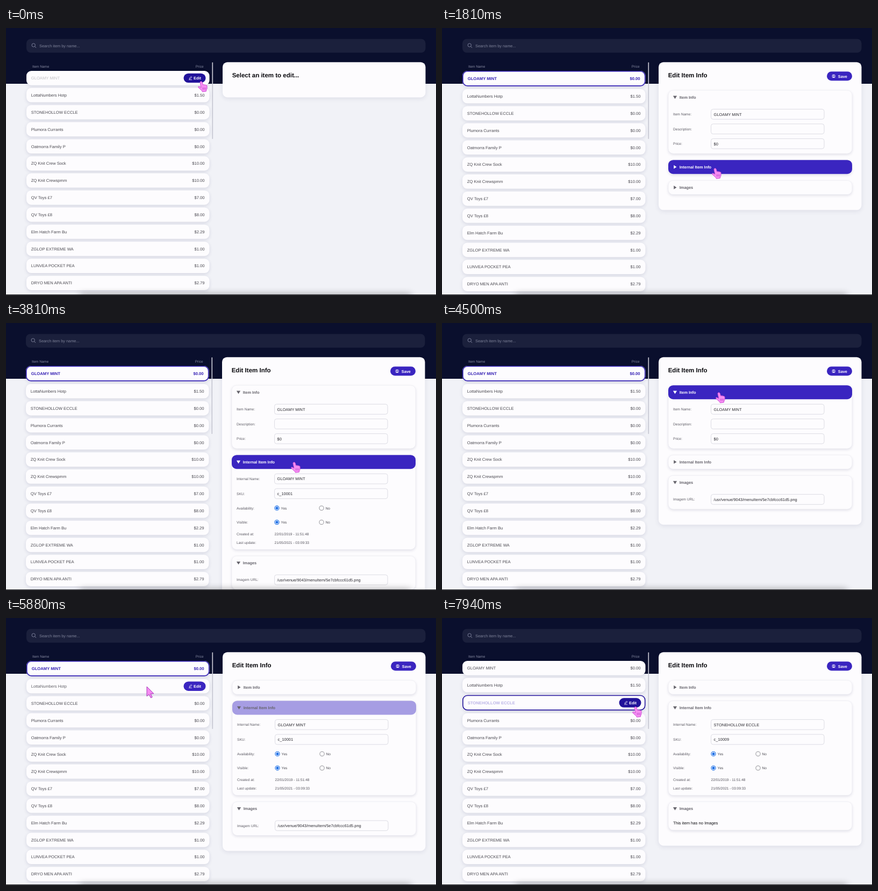
Write an HTML page with a canvas that moves like this. It is 800 by 498 pixels and loops after 8000 ms.

```html
<!DOCTYPE html>
<html lang="en">
<head>
<meta charset="utf-8">
<title>Item editor</title>
<style>
html, body { margin: 0; width: 100%; height: 100%; overflow: hidden; background: #f1f2f7; }
canvas { display: block; width: 800px; height: 498px; }
</style>
</head>
<body>
<canvas id="stage"></canvas>
<script>
const W = 800, H = 498, LOOP = 8000, FADE = 200;
const canvas = document.getElementById('stage');
const ctx = canvas.getContext('2d');
const dpr = window.devicePixelRatio || 1;
canvas.width = W * dpr;
canvas.height = H * dpr;

const PURPLE = '#3a25c0', DEEP = '#21129a', CARD = '#fdfcfe', GREY = '#66646c';

const items = [
  ['GLOAMY MINT', '$0.00'], ['LottaNumbers Hotp', '$1.50'],
  ['STONEHOLLOW ECCLE', '$0.00'], ['Plumora Currants', '$0.00'],
  ['Oatmorra Family P', '$0.00'], ['ZQ Knit Crew Sock', '$10.00'],
  ['ZQ Knit Crewspmm', '$10.00'], ['QV Toys £7', '$7.00'],
  ['QV Toys £8', '$8.00'], ['Elm Hatch Farm Bu', '$2.29'],
  ['ZGLOP EXTREME WA', '$1.00'], ['LUNVEA POCKET PEA', '$1.00'],
  ['DRYO MEN APA ANTI', '$2.79']
];
const details = [
  { sku: 'c_10001', price: '$0', url: '/usr/venue/9043/menuItem/5e7cbfccc61d5.png' },
  { sku: 'c_10005', price: '$1.5' },
  { sku: 'c_10009', price: '$0' }
];

// Hover intervals in ms
const rowHover = [[-900, 540], [5840, 7000], [7000, 9000]];
const editHover = [[-900, 540], [5990, 6960], [7060, 9000]];
const headHover = {
  item: [[4200, 4780]],
  internal: [[1450, 2450], [3450, 4190], [4790, 5770]],
  images: [[2480, 3380]]
};

// Pointer path: time, x, y
const path = [
  [0, 363, 100], [450, 363, 100], [720, 440, 150], [1550, 507, 259], [1810, 508, 262],
  [2350, 508, 263], [2580, 514, 436], [2940, 514, 435], [3280, 514, 435], [3560, 535, 259],
  [3810, 536, 260], [4100, 536, 260], [4300, 515, 130], [4680, 515, 130], [4940, 509, 178],
  [5150, 507, 172], [5700, 505, 170], [5880, 262, 128], [6100, 357, 126], [6880, 358, 126],
  [7160, 360, 160], [7940, 360, 166], [8000, 360, 166]
];

const clamp = v => Math.max(0, Math.min(1, v));
const within = (t, [a, b]) => t >= a && t < b;
const ramp = (t, [a, b]) => clamp((t - a) / FADE) * (1 - clamp((t - b) / FADE));

function selected(t) {
  return t < 350 ? -1 : t < 6400 ? 0 : t < 7600 ? 1 : 2;
}

function pointerAt(t) {
  let i = 1;
  while (i < path.length - 1 && path[i][0] < t) i++;
  const [t0, x0, y0] = path[i - 1], [t1, x1, y1] = path[i];
  const k = clamp((t - t0) / (t1 - t0)), e = k * k * (3 - 2 * k);
  return [x0 + (x1 - x0) * e, y0 + (y1 - y0) * e];
}

function text(s, x, y, size, color, bold, align = 'left') {
  ctx.font = `${bold ? 'bold ' : ''}${size}px "Liberation Sans", Arial, sans-serif`;
  ctx.textAlign = align;
  ctx.fillStyle = color;
  ctx.fillText(s, x, y + size * 0.36);
}

function box(x, y, w, h, r, fill, stroke, line = 1) {
  ctx.beginPath();
  ctx.roundRect(x, y, w, h, r);
  if (fill) { ctx.fillStyle = fill; ctx.fill(); }
  if (stroke) { ctx.strokeStyle = stroke; ctx.lineWidth = line; ctx.stroke(); }
}

function raised(x, y, w, h, r, blur = 6, alpha = 0.13) {
  ctx.save();
  ctx.shadowColor = `rgba(40,40,90,${alpha})`;
  ctx.shadowBlur = blur * dpr;
  ctx.shadowOffsetY = 2 * dpr;
  box(x, y, w, h, r, CARD);
  ctx.restore();
}

function lines(points, color, width) {
  ctx.beginPath();
  points.forEach(([x, y], i) => i ? ctx.lineTo(x, y) : ctx.moveTo(x, y));
  ctx.strokeStyle = color;
  ctx.lineWidth = width;
  ctx.stroke();
}

function triangle(x, y, open, color) {
  ctx.beginPath();
  if (open) { ctx.moveTo(x - 3.6, y - 2.6); ctx.lineTo(x + 3.6, y - 2.6); ctx.lineTo(x, y + 3); }
  else { ctx.moveTo(x - 2.3, y - 3.4); ctx.lineTo(x + 3, y); ctx.lineTo(x - 2.3, y + 3.4); }
  ctx.fillStyle = color;
  ctx.fill();
}

function drawBackdrop() {
  ctx.fillStyle = '#f1f2f7';
  ctx.fillRect(-2, 0, W + 4, H);
  ctx.fillStyle = '#0a0f2d';
  ctx.fillRect(-2, 0, W + 4, 104);
  box(38, 20.5, 742.5, 25.5, 8, '#1b203c');
  ctx.beginPath();
  ctx.arc(51.2, 32, 3.2, 0, 7);
  ctx.strokeStyle = '#858aa3';
  ctx.lineWidth = 0.9;
  ctx.stroke();
  lines([[53.5, 34.3], [56, 36.9]], '#858aa3', 1);
  text('Search item by name...', 62, 33.3, 7.35, '#7f839a');
  text('Item Name', 49, 72, 6.4, '#888ca3');
  text('Price', 367.5, 72, 6.5, '#888ca3', false, 'right');
  box(383.4, 64, 1.7, 143, 0.8, '#c6c7d2');
}

function drawEdit(right, y, dark) {
  const x = right - 41;
  box(x, y - 8.7, 41, 17.4, 8.7, dark ? DEEP : PURPLE);
  lines([[x + 10.5, y + 2], [x + 11, y], [x + 14, y - 3], [x + 15.3, y - 1.7], [x + 12.2, y + 1.5], [x + 10.5, y + 2]], '#fff', 0.8);
  lines([[x + 9.5, y + 3.2], [x + 15.5, y + 3.2]], '#fff', 0.7);
  text('Edit', x + 18.5, y + 0.2, 7.4, '#fff', true);
}

function drawList(t, sel) {
  let y = 80;
  items.forEach(([name, price], i) => {
    const on = i === sel, h = on ? 28.7 : 26.7, mid = y + h / 2, pad = on ? 1 : 0;
    const hover = i < 3 && within(t, rowHover[i]);
    const dark = i < 3 && within(t, editHover[i]);
    raised(38, y, 340.5, h, 9);
    if (on) box(38.8, y + 0.8, 338.9, h - 1.6, 8.5, null, dark ? DEEP : '#3422b4', 1.6);
    ctx.globalAlpha = i < 3 ? 1 - 0.67 * ramp(t, rowHover[i]) : 1;
    const ink = on ? '#3520b5' : '#4b4a51';
    text(name, 46.7 + pad, mid, 7.65, ink, on);
    ctx.globalAlpha = 1;
    if (hover) drawEdit(371.5 - pad, mid, dark);
    else text(price, 369.6 - pad, mid, 7.65, ink, on, 'right');
    y += h + 5.15;
  });
}

function label(s, y) {
  text(s, 430, y, 6.6, '#5c5a63');
}

function field(name, value, y) {
  label(name, y);
  box(500.5, y - 9.3, 210.5, 18.8, 4, CARD, '#dadae1', 0.9);
  text(value, 505.6, y + 0.3, 7.45, '#2c2b31');
}

function radios(name, y) {
  label(name, y);
  ['Yes', 'No'].forEach((s, i) => {
    const x = 505 + i * 83;
    ctx.beginPath();
    ctx.arc(x, y, 4.1, 0, 7);
    ctx.strokeStyle = i ? '#77767d' : '#1b6ee6';
    ctx.lineWidth = i ? 0.8 : 1.1;
    ctx.stroke();
    if (!i) {
      ctx.beginPath();
      ctx.arc(x, y, 2.5, 0, 7);
      ctx.fillStyle = '#1b6ee6';
      ctx.fill();
    }
    text(s, x + 7.6, y, 6.6, '#4b4a51');
  });
}

function stamp(name, value, y) {
  label(name, y);
  text(value, 500.5, y, 6.6, '#55535c');
}

function sections(t, sel) {
  const d = details[sel], name = items[sel][0];
  return [
    {
      key: 'item', title: 'Item Info', open: t < 4550, height: 118,
      body(y) {
        field('Item Name:', name, y + 31.5);
        field('Description:', '', y + 59);
        field('Price:', d.price, y + 86.5);
      }
    },
    {
      key: 'internal', title: 'Internal Item Info', height: 176.3,
      open: within(t, [1950, 3900]) || t >= 5100,
      body(y) {
        field('Internal Name:', name, y + 31.3);
        field('SKU:', d.sku, y + 59);
        radios('Availability:', y + 86);
        radios('Visible:', y + 112.4);
        stamp('Created at:', '22/01/2019 - 11:51:48', y + 134);
        stamp('Last update:', '21/05/2021 - 03:09:33', y + 150.5);
      }
    },
    {
      key: 'images', title: 'Images', open: t >= 2700, height: d.url ? 62.8 : 53,
      body(y) {
        if (d.url) field('Imagem URL:', d.url, y + 31.5);
        else text('This item has no Images', 430, y + 26.5, 7.65, '#0c0c10');
      }
    }
  ];
}

const cardHeight = s => s.open ? s.height : 26.2;
const panelBottom = list => list.reduce((y, s) => y + cardHeight(s) + 12, 116.2) + 17;

function drawSave() {
  box(716, 81.3, 47, 17, 8.5, PURPLE);
  box(726.2, 87.4, 5, 5, 0.8, null, '#fff', 0.8);
  ctx.fillStyle = '#fff';
  ctx.fillRect(727.3, 87.4, 2.4, 1.5);
  ctx.fillRect(727.3, 90.4, 2.8, 1.6);
  text('Save', 736.8, 90, 7.3, '#fff', true);
}

function drawSection(s, top, t) {
  const mid = top + 13, spans = headHover[s.key];
  const tint = Math.max(...spans.map(span => ramp(t, span)));
  const ink = spans.some(span => within(t, span)) ? '#fff' : GREY;
  raised(421, top, 342, cardHeight(s), 9, 5, 0.14);
  box(421, top, 342, cardHeight(s), 9, null, '#ededf3', 0.7);
  if (tint) {
    ctx.globalAlpha = tint;
    box(421, top, 342, 26, 9, PURPLE);
    ctx.globalAlpha = 1;
  }
  triangle(433.5, mid, s.open, ink);
  text(s.title, 441.8, mid, 7.36, ink, true);
  if (s.open) s.body(mid);
}

function drawPanel(t, list) {
  const bottom = list ? panelBottom(list) : 129.5;
  raised(403, 63.7, 377.5, bottom - 63.7, 9, 8, 0.1);
  text(list ? 'Edit Item Info' : 'Select an item to edit...', 420.7, 87.7, 11.5, '#09090d', true);
  if (!list) return;
  drawSave();
  let y = 116.2;
  for (const s of list) {
    drawSection(s, y, t);
    y += cardHeight(s) + 12;
  }
}

function drawBottomEdge() {
  ctx.save();
  ctx.shadowColor = 'rgba(0,0,0,.42)';
  ctx.shadowBlur = 13 * dpr;
  ctx.fillStyle = '#17171b';
  ctx.fillRect(138, 497, 615, 8);
  ctx.restore();
  ctx.fillStyle = '#17171b';
  ctx.fillRect(0, 497, W, 1);
}

const HAND = new Path2D('M5 1Q7 0 8 2L9.5 7Q11 6 12 7.2Q13.5 6.2 14.5 7.5Q16.5 7 17 9L17 13Q17 16 15.5 17L15.5 19L8.5 20L7.5 18L1 12Q0 10 2 9.8L6 12L4 3Q3.8 1.5 5 1Z');
const ARROW = new Path2D('M0 0L0 18L4 14.5L7.5 21L10.2 19.6L7 13.5L12.8 13Z');

function drawPointer(t) {
  const [x, y] = pointerAt(t);
  const hand = [...Object.values(headHover).flat(), ...editHover].some(span => within(t, span));
  ctx.save();
  ctx.translate(hand ? x - 6 : x, hand ? y - 1 : y);
  const shape = hand ? HAND : ARROW;
  ctx.lineJoin = 'round';
  ctx.fillStyle = '#f58cf2';
  ctx.fill(shape);
  ctx.strokeStyle = hand ? '#cf4fd6' : '#a53bb8';
  ctx.lineWidth = 1;
  ctx.stroke(shape);
  if (hand) for (const fx of [9.2, 11.6, 14]) lines([[fx, 12], [fx + 0.3, 16]], '#b544c4', 0.8);
  ctx.restore();
}

function draw(t) {
  const sel = selected(t);
  const list = sel < 0 ? null : sections(t, sel);
  ctx.setTransform(dpr, 0, 0, dpr, 0, 0);
  ctx.textRendering = 'geometricPrecision';
  ctx.save();
  // A page scrollbar nudges the layout when the panel overflows
  if (list && panelBottom(list) > H) ctx.translate(-1, 0);
  drawBackdrop();
  drawList(t, sel);
  drawPanel(t, list);
  ctx.restore();
  drawBottomEdge();
  drawPointer(t);
}

const start = performance.now();
function tick() {
  draw((performance.now() - start) % LOOP);
  requestAnimationFrame(tick);
}
tick();
</script>
</body>
</html>
```
